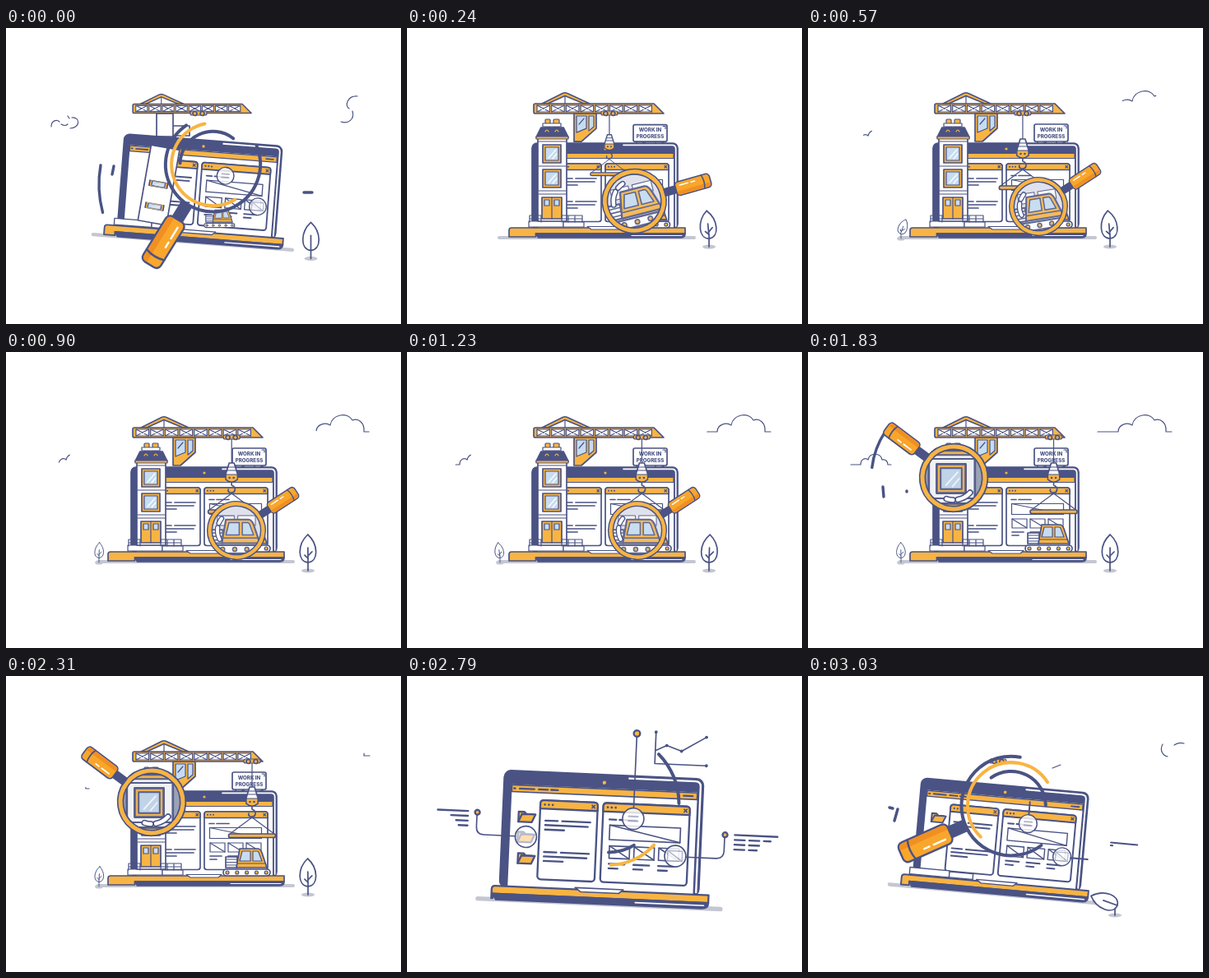
An HTML page for the animation above (3090 ms loop, 480 by 360 pixels).

```html
<!DOCTYPE html>
<html lang="en">
<head>
<meta charset="utf-8">
<title>Work in progress</title>
<style>
html,body{margin:0;width:100%;height:100%;overflow:hidden;background:#fff}
svg{display:block;width:100vw;height:100vh}
.n{fill:none;stroke:#4a5384;stroke-width:1.7;stroke-linecap:round;stroke-linejoin:round}
.t{stroke-width:1.2}
.thick{stroke-width:3.4}
.w{fill:#fff}.o{fill:#f8b443}.d{fill:#4a5384}.b{fill:#c6dcf1}.g{fill:#c4c7d2}
.hot{fill:#f9a62c}
.lite{stroke:#fff}.gold{stroke:#f8b443}
text{font:800 6.2px Inter,"Open Sans",sans-serif;fill:#4a5384;text-anchor:middle}
</style>
</head>
<body>
<svg viewBox="0 0 480 360">
<defs><clipPath id="glass"><circle r="37"/></clipPath></defs>
<path id="cloudR" class="n t" pathLength="100" d="M352 97H377C377 88 388 85 394 89C396 76 415 72 421 83C428 80 436 86 435 97H442"/>
<path id="cloudL" class="n t" pathLength="100" d="M52 137H64C64 130 70 128 73 131C75 122 88 122 90 131C95 130 97 134 97 137H101"/>
<path id="curlA" class="n t" d="M55 120C55 112 62 111 65 114M67 117q5 3 8 0M75 107l2 3M80 109C91 108 90 122 78 122M427 83C415 82 411 95 417 98M421 101C424 111 416 117 407 114"/>
<path id="curlB" class="n t" d="M431 83C427 90 431 97 437 98M445 84Q450 80 457 82M297 112l10-4"/>
<g id="crane"></g>
<g id="sign">
  <path class="n" d="M279 138v8M289 138v8M302 138v8M312 138v8M279 146l10-8M302 146l10-8"/>
  <rect class="n w" x="275" y="117" width="41" height="21" rx="2"/>
  <text x="295.5" y="126">WORK IN</text><text x="295.5" y="134">PROGRESS</text>
  <path class="n t" d="M311 119h3v3"/>
</g>
<g id="laptop"></g>
<g id="house"><g id="houseArt"></g></g>
<g id="truck"><g id="truckArt">
  <path class="n w" d="M267 220h14v13h-14z"/>
  <path class="n t" d="M268 223h12M268 226.500h12M268 230h12"/>
  <path class="n o" d="M280 233L284 210H306Q309 210 311 215L317 233Z"/>
  <path class="n b t" d="M284 225L287 213H297V225ZM300 213h5q2 0 3 4l3 8h-11z"/>
  <path class="n t" d="M282 228h33"/>
  <rect class="n w" x="264" y="235" width="57" height="8" rx="4"/>
  <g id="wheels"></g>
</g></g>
<g id="hook">
  <path id="rope" class="n t"/>
  <g id="load">
    <path class="n w" d="M-3 0h6l4 13v7q-7 6-14 0v-7z"/>
    <path class="n t" d="M-4 5h8M-5 9h10"/>
    <path class="n o t" d="M-7 14h14v6q-7 6-14 0z"/><circle class="d" cx="-2.500" cy="18" r="1.300"/><circle class="d" cx="2.500" cy="18" r="1.300"/>
    <path class="n" d="M0 24v3q5 2 4 6t-6 3q-3-1-2-4"/>
    <path class="n t" d="M-27 57L0 37L27 57"/>
    <rect class="n o" x="-28.500" y="57" width="57" height="4.500" rx="2"/>
  </g>
</g>
<g id="trolley">
  <rect class="n o t" x="-10" y="101" width="20" height="5" rx="2"/>
  <circle class="n o" cx="-4.500" cy="104" r="2.500"/><circle class="n o" cx="4.500" cy="104" r="2.500"/>
</g>
<g id="treeR"></g>
<g id="treeL"></g>
<g id="rings" class="n"><path/><path class="gold"/><path/></g>
<path id="trail" class="n thick"/>
<g id="lens">
  <g id="pane">
    <circle id="tint" r="38"/>
    <g clip-path="url(#glass)" opacity=".85">
      <g id="zoomTruck">
        <path class="n w t" d="M-27 -21H-3V-7H-27ZM2 -21H27V-7H2ZM-40 24H40"/>
        <use href="#truckArt" transform="translate(4 2) scale(1.46) translate(-297 -222)"/>
      </g>
      <use id="zoomHouse" href="#houseArt" transform="translate(-3 1) scale(1.6) translate(-176 -153)"/>
    </g>
  </g>
  <g id="tool">
    <g id="rim">
      <path class="shine n" stroke-width="7.500"/><path class="shine n lite" stroke-width="4.500"/>
      <circle class="n" r="38" style="stroke-width:8.400"/>
      <circle class="n gold" r="38" style="stroke-width:5"/>
    </g>
    <rect class="d" x="40" y="-5.500" width="18" height="11" rx="2"/>
    <rect class="n hot" x="56" y="-9" width="46" height="18" rx="4.500"/>
    <path fill="#f08f22" d="M57 3H101V4.500q0 3.500-4 3.500H60q-3 0-3-3.500z"/>
    <path class="n" d="M92 -9q3 9 0 18"/>
    <path class="n lite" d="M62 -4h11M77 -4h5"/>
  </g>
</g>
</svg>
<script>
const LOOP = 3090, STEP = 30, EXIT = 2340;
const $ = id => document.getElementById(id);
const set = (id, tf) => $(id).setAttribute('transform', tf);
const show = (id, on) => { $(id).style.display = on ? '' : 'none'; };

// Markup helpers
const rect = (x, y, w, h, c = 'n w t', r = 0) =>
  `<rect x="${x}" y="${y}" width="${w}" height="${h}" rx="${r}" class="${c}"/>`;
const path = (d, c = 'n t') => `<path class="${c}" d="${d}"/>`;
const dot = (x, y, r, c) => `<circle cx="${x}" cy="${y}" r="${r}" class="${c}"/>`;
const bar = (x, y, w) => path(`M${x} ${y}h${w}`, 'n');
const group = (id, s) => `<g id="${id}">${s}</g>`;
const repeat = (n, f) => Array.from({length: n}, (_, i) => f(i)).join('');
const crossed = (x, y, w, h) => rect(x, y, w, h) + path(`M${x} ${y}l${w} ${h}`);

// Motion helpers
const smooth = u => u * u * (3 - 2 * u);
const out = u => 1 - (1 - u) ** 3;
const back = u => 1 + 2.2 * (u - 1) ** 3 + 1.2 * (u - 1) ** 2;
const part = (s, start, len) => Math.min(1, Math.max(0, (s - start) / len));
const go = (s, start, len, a, b, ease = smooth) => a + (b - a) * ease(part(s, start, len));
const pop = (s, start) => go(s, start, 210, 0, 1, back) * go(s, EXIT, 105, 1, 0);
const scaleAt = (x, y, sx, sy = sx) => `translate(${x} ${y}) scale(${sx} ${sy}) translate(${-x} ${-y})`;

function arc(cx, cy, r, a, b) {
  b = Math.min(b, a + 359);
  if (b - a < 1) return '';
  const pt = d => `${cx + r * Math.cos(d * Math.PI / 180)} ${cy + r * Math.sin(d * Math.PI / 180)}`;
  return `M${pt(a)}A${r} ${r} 0 ${b - a > 180 ? 1 : 0} 1 ${pt(b)}`;
}

function buildCrane() {
  const truss = repeat(8, i => {
    const x = 158 + i * 17.7;
    return rect(x, 94, 15.5, 8) + path(`M${x} 94l15.500 8m0-8l-15.500 8`);
  });
  $('crane').innerHTML =
    group('mast', path('M183 104H203V132H183ZM203 119h20v12h-20', 'n w')) +
    group('cab', path('M203 104H230V122L212 138H203Z', 'n o') +
      path('M206 107H218V122L206 127Z', 'n b t') + path('M221 107h6v13l-6 5zM209 117l6-7', 'n b t')) +
    group('jib', path('M164 92L189 79.500Q192 78 195 79.500L222 92H215L192 82.500L171 92Z', 'n o') + path('M192 83V92') +
      path('M156 92H300L312 104H156Q154 104 154 102V94Q154 92 156 92Z', 'n o') + truss);
}

const folder = (x, y) => path(`M${x - 7} ${y + 5}v-9h5l2 2h6v2`, 'n o') +
  path(`M${x - 7} ${y + 5}l3-7h12l-3 7z`, 'n o');

const browser = (x, w) => rect(x, 165, w, 70.5, 'n w', 3) +
  path(`M${x} 172.500V168q0-3 3-3H${x + w - 3}q3 0 3 3V172.500Z`, 'n o') +
  repeat(3, i => dot(x + 4 + i * 3.5, 168.8, 1, 'd')) +
  path(`M${x + w - 5} 167.500l2.500 2.500m0-2.500l-2.500 2.500`);

const paragraph = (x, y) => bar(x, y, 11) + bar(x + 15, y, 25) + bar(x, y + 4, 38) + bar(x, y + 8, 17);

const callout = (d, x, y, r) => path(d) + dot(x, y, r, 'n o');
const mark = (x, y, inner) => `<circle cx="${x}" cy="${y}" r="9.5" class="n t" fill-opacity=".8" style="fill:#fff"/>` +
  `<g opacity=".4">${inner}</g>`;

function buildLaptop() {
  const graph = 'L294 111.500L307.400 116L329 102.700';
  $('laptop').innerHTML =
    '<rect id="shadow" class="g" y="253" height="4" rx="2"/>' +
    rect(151, 140, 177, 104, 'n d', 6) +
    path('M262 142.300H321Q325.700 142.300 325.700 147V241', 'n lite') +
    rect(158, 152, 165, 92, 'w') + rect(158, 152.5, 165, 6, 'n o t') + dot(240, 147, 1.6, 'o') +
    group('menu', bar(160, 155.5, 1) + bar(165, 155.5, 13) + bar(182, 155.5, 8) + bar(193, 155.5, 6) + bar(311, 155.5, 8)) +
    group('files', folder(172, 180)) +
    group('moreFiles', folder(173, 217) + mark(172.3, 198.2, folder(172, 198))) +
    browser(184, 51) + browser(240, 77) +
    paragraph(189, 183) + paragraph(189, 211) + bar(246, 179.5, 6) + bar(255, 179.5, 15) +
    crossed(246.5, 184.5, 63, 13) +
    repeat(3, i => crossed(247 + i * 22, 203, 18, 11) + bar(247 + i * 22, 219, 14) + bar(247 + i * 22, 223, 8)) +
    path('', 'n o" id="deck') + path('', 'n d" id="lip') + path('M272 252.500H333', 'n t lite') +
    path('M218 241.500H261L257 245H223Z', 'n w t') +
    group('step', rect(147, 235, 42, 7) + rect(189, 236, 25, 6)) +
    group('marks', mark(267, 178, bar(263, 176, 8) + bar(263, 180, 8)) + mark(305.8, 209.6, crossed(299, 205, 13, 9))) +
    group('notes', callout('M267 168V102', 267, 102, 2.8) +
      callout('M163 198H135Q128 198 128 191V179', 128.3, 178.3, 2.2) +
      callout('M315 210H342Q349 210 349 203V189', 349.3, 188.7, 2.2)) +
    group('chart', path('M284 100V128H330M284 116.400' + graph) +
      graph.slice(1).split('L').map(p => dot(...p.split(' '), 1.4, 'd')).join('') +
      dot(284, 100, 1.4, 'd') + dot(330, 128, 1.4, 'd')) +
    group('copy', repeat(4, i => {
      const w = 27 / (1 + i * .8), y = i * 4.3;
      return bar(120 - w, 177.5 + y, w) +
        `<path class="n" stroke-dasharray="${i ? '9 4' : ''}" d="M358 ${188.5 + y}h${38 - 6 * i}"/>`;
    })) +
    group('scraps', path('M356 190h28M356 193h2M315 210H333M267 168V155', 'n'));
}

function buildHouse() {
  const pane = '<g class="win">' + rect(-11, -11, 22, 22, 'n o') + rect(-8, -8, 16, 16, 'n b t') +
    path('M-4 5L5 -5M1 6L6 0', 'n t lite') + '</g>';
  $('houseArt').innerHTML = rect(159, 133, 35, 102, 'n w') +
    group('trim', path('M160 138h33M160 168h33M160 198h33M160 202h33')) + pane + pane +
    group('roof', rect(168, 111, 6, 10, 'n o t', 1) + rect(178, 111, 7, 10, 'n o t', 1) +
      rect(165, 116, 22, 4) + path('M163 121H190L196 133H157Z', 'n d') +
      path('M168 126q2-4 4 0M180 126q2-4 4 0', 'n t gold') + rect(157, 132, 39, 3, 'n o t')) +
    group('door', rect(164, 206, 24, 26, 'n o') + path('M176 206v26') +
      rect(167, 209, 6, 7, 'n b t') + rect(179, 209, 6, 7, 'n b t')) +
    group('fence', path('M149 236V228H163V236M188 236V228H213V236M149 232h14M188 232h25M196 228v8M204 228v8'));
}

function buildTree(id, k) {
  $(id).innerHTML = `<ellipse class="g" rx="${7 * k + 1}" ry="2.600"/><g transform="scale(${k})">` +
    path('M0 0V-15', 'n') + '<g class="leaf">' +
    path('M0 -44C-13 -32 -13 -11 0 -10C13 -11 13 -32 0 -44Z', 'n w') +
    path('M0 -10V-28', 'n') + path('M0 -18l5-5M0 -15l-4-4', 'n vein') + '</g></g>';
}

function drawLaptop(s) {
  const big = s < 2000 ? go(s, -330, 480, 1, 0) : go(s, 2370, 210, 0, 1, back);
  const tilt = 5.3 * Math.sin(Math.PI * part(s, -390, 570));
  const left = 123 + 21 * Math.max(0, big) ** .3, lip = left + 1 + (144 - left) * 1.5;
  set('laptop', `translate(${152 - 33.5 * big} ${140 - 22 * big - 1.35 * tilt}) rotate(${tilt})` +
    ` scale(${1 + .37 * big}) translate(-151 -140)`);
  $('shadow').setAttribute('x', left - 14);
  $('shadow').setAttribute('width', 364 - left);
  $('deck').setAttribute('d', `M${left} 246Q${left} 243 ${left + 3} 243H337V250H${lip}V254H${left}Z`);
  $('lip').setAttribute('d', `M${lip} 250H337Q337 255 331 255H${lip + 3}Z`);
  const late = s > 2520;
  show('menu', late || s < 90);
  show('files', late || s < -30);
  show('moreFiles', late || s < -180);
  show('marks', late || s < 75);
  show('notes', late || s < -150);
  show('chart', late || s < -210);
  show('copy', late || s < -180);
  show('scraps', s > -180 && s < -30);
  show('step', s > -90 && s < 2430);
}

function drawSite(s) {
  const on = s >= 0 && s < 2430, grow = pop(s, -75), drop = pop(s, 180), raise = pop(s, 150);
  ['crane', 'house', 'truck'].forEach(id => show(id, on));
  set('jib', scaleAt(155, 98, grow));
  show('mast', s < 90);
  show('cab', s >= 60);
  set('cab', scaleAt(216, 104, 1, pop(s, 45)));

  set('house', `translate(170 242) rotate(${go(s, 0, 150, 10, 0)}) scale(1 ${grow}) translate(-170 -242)`);
  const open = go(s, 0, 210, 0, 1, back);
  document.querySelectorAll('.win').forEach((w, i) => w.setAttribute('transform',
    `translate(176 ${153 + 30 * i + 30 * (1 - open)}) scale(1 ${.35 + .65 * open})`));
  ['roof', 'trim', 'fence'].forEach(id => show(id, s >= 60));
  show('door', s >= 90);

  show('sign', raise > .02);
  set('sign', scaleAt(295, 146, 1, raise));
  set('truck', `translate(${go(s, 0, 270, -33, 0)} 0) ` + scaleAt(292, 242, go(s, 0, 270, .65, 1) * go(s, EXIT, 105, 1, 0)));

  const x = 234 + 65 * (1 - (1 - Math.min(1, s / 1900)) ** 1.5), y = 107 + 28 * drop;
  show('trolley', s > -90 && s < 2430);
  set('trolley', `translate(${x} 0)`);
  show('hook', drop > .03);
  $('rope').setAttribute('d', `M${x} 106V${y}`);
  set('load', `translate(${x} ${y}) scale(${Math.min(1, drop)})`);
}

function drawTrees(s) {
  const sway = -10 * Math.sin(s / 300) * Math.exp(-s / 900) * part(s, 0, 60);
  const small = pop(s, 240);
  const bend = (id, a) => $(id).querySelector('.leaf').setAttribute('transform', `rotate(${a} 0 -13)`);
  show('treeR', s >= -90 && s < 2430);
  set('treeR', `translate(${go(s, -60, 360, 373, 367, out)} ${go(s, -60, 360, 291, 266, out)}) scale(${go(s, EXIT, 105, 1, 0)})`);
  bend('treeR', go(s, -60, 60, -70, 0) + sway);
  $('treeR').querySelector('.vein').style.display = s < 150 ? 'none' : '';
  show('treeL', small > .02);
  set('treeL', `translate(113 256) scale(${small})`);
  bend('treeL', -4 * sway);
}

function drawLens(s) {
  const shift = part(s, 1560, 270), move = smooth(shift), drift = go(s, -120, 450, 0, 1);
  const x = 243 + 37 * drift - 103 * move, y = 155 + 62 * drift - 64 * move;
  const r = go(s, -210, 90, 20, 58) - go(s, -30, 360, 0, 23) + 6 * move;
  const angle = go(s, -210, 540, 200, -33) - 110 * move;
  const whole = s >= 90, house = shift > .5;
  show('lens', s >= -210 && s < 2430);
  show('pane', whole);
  show('rim', whole);
  set('lens', `translate(${x} ${y}) scale(${r / 41 * go(s, EXIT, 90, 1, 0)})`);
  set('tool', `rotate(${angle})`);
  set('zoomTruck', `rotate(${go(s, 330, 600, -14, 0)})`);
  $('tint').setAttribute('fill', house ? '#9ba2b9' : '#dfe2ec');
  show('zoomTruck', !house);
  show('zoomHouse', house);

  // Arcs unwind from wide strokes and close into the rim
  const u = part(s, -360, 450), v = part(s, -300, 390);
  const ring = (i, radius, from, head, tail) => {
    const p = $('rings').children[i];
    p.setAttribute('d', arc(x + 2, y, radius * (1 + .7 * (1 - u) ** 2), from - head * u ** 1.2, from - tail * v * v));
    p.style.strokeWidth = 4;
  };
  show('rings', s < 90);
  ring(0, 56, 0, 500, 210);
  ring(1, 49, 88, 510, 320);
  ring(2, 39, 90, 350, 240);

  let d = '';
  if (s > -90 && s < -30) d = 'M109 162l-4 14M99 160l4 1';
  else if (s >= -30 && s < 75) d = arc(246, 190, 133, 165, 190) + 'M131 168l-2 10M362 200h10';
  else if (s >= 1740 && s < 1920) d = arc(179, 153, 102, 187, 213) + 'M91 164l1 12M120 169v1';
  $('trail').setAttribute('d', d);
}

function drawSky(s) {
  const from = go(s, 450, 1300, 32, 0) + go(s, 1900, 500, 0, 100);
  const cloud = (id, to) => {
    show(id, s >= 480 && to - from > 1);
    $(id).style.strokeDasharray = `${Math.max(0, to - from)} 300`;
    $(id).style.strokeDashoffset = -from;
  };
  cloud('cloudR', go(s, 450, 600, 50, 100, out));
  cloud('cloudL', go(s, 1230, 500, 52, 100));
  show('curlA', s >= -30 && s < 120);
  show('curlB', s >= -120 && s < -30);
}

buildCrane();
buildLaptop();
buildHouse();
buildTree('treeR', 1);
buildTree('treeL', .55);
$('wheels').innerHTML = repeat(5, i => dot(269 + i * 11.8, 239, 2, 'n o t'));
document.querySelectorAll('.shine').forEach((p, i) => {
  p.setAttribute('d', arc(0, 0, 27, 185, 222) + arc(0, 0, 27, 235, 252));
  p.style.strokeWidth = i ? 4.5 : 7.5;
});

const start = performance.now();
function tick() {
  const t = Math.min(3030, Math.floor((performance.now() - start) % LOOP / STEP) * STEP);
  const s = t > 2700 ? t - LOOP : t; // the wind-up before the loop point runs below zero
  [drawLaptop, drawSite, drawTrees, drawLens, drawSky].forEach(draw => draw(s));
  requestAnimationFrame(tick);
}
tick();
</script>
</body>
</html>
```
